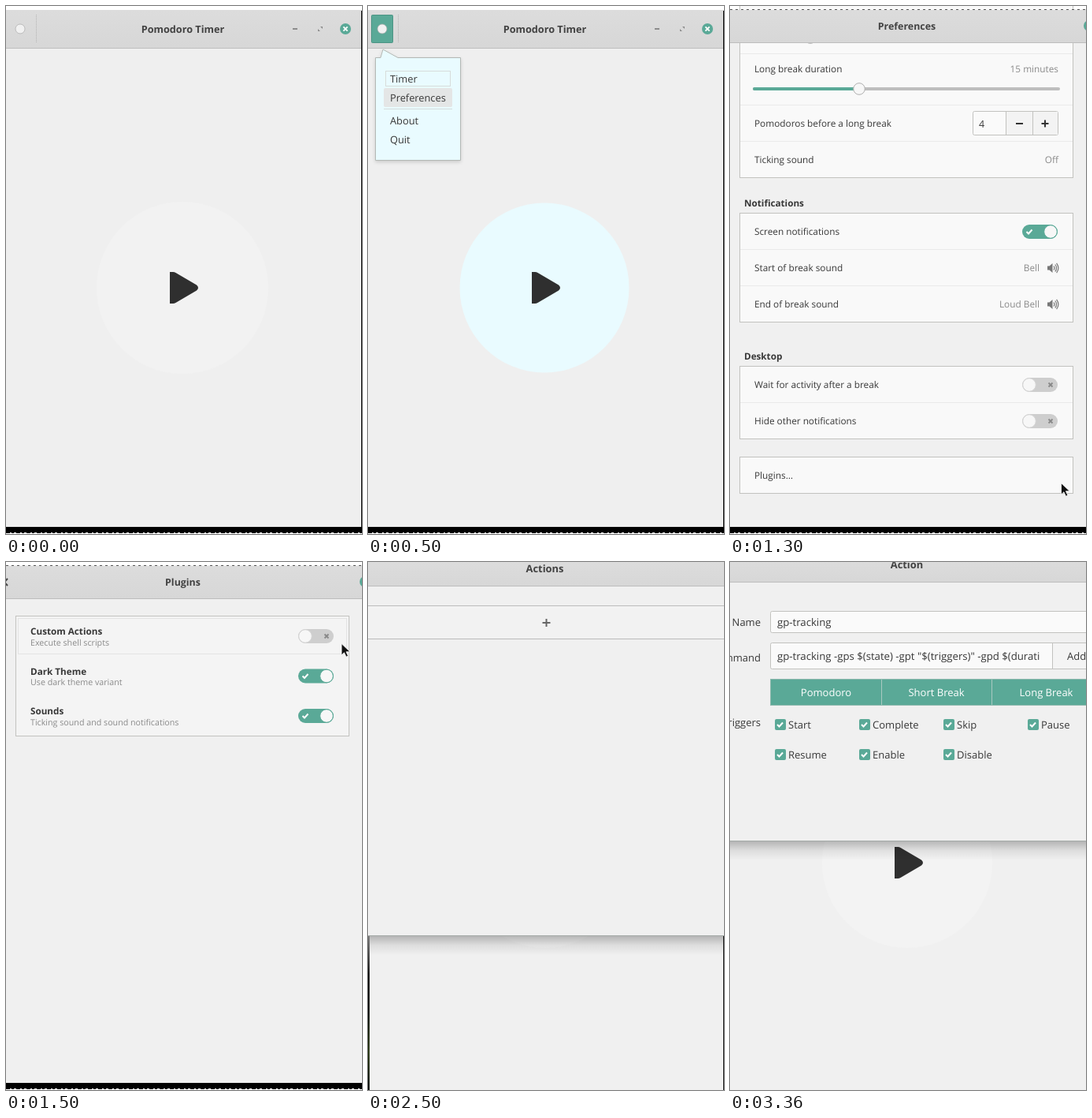
These frames come from a looping animation (452x669 px, 3600 ms). An HTML page:

```html
<!DOCTYPE html>
<html lang="en">
<head>
<meta charset="utf-8">
<title>Pomodoro timer tour</title>
<style>
  html, body { margin: 0; width: 100%; height: 100%; overflow: hidden; background: #fff; }
  svg { display: block; }
  text { font-family: "Open Sans", "Noto Sans", sans-serif; white-space: pre; text-rendering: geometricPrecision; }
</style>
</head>
<body>
<svg id="stage" width="452" height="669" viewBox="0 0 452 669"></svg>
<script>
const TEAL = '#5aa997', INK = '#383838', GREY = '#8a8a8a', EDGE = '#c2c2bf', PAPER = '#f0f0f0', ICE = '#e9fbff';

const rect = (x, y, w, h, fill, more = '') =>
  `<rect x="${x}" y="${y}" width="${w}" height="${h}" fill="${fill}" ${more}/>`;
const box = (x, y, w, h, fill = '#f9f9f9', more = '') =>
  rect(x + .5, y + .5, w, h, fill, `stroke="${EDGE}" ${more}`);
const circle = (x, y, r, fill, more = '') => `<circle cx="${x}" cy="${y}" r="${r}" fill="${fill}" ${more}/>`;
const stroke = (d, color, width = 1, more = '') =>
  `<path d="${d}" fill="none" stroke="${color}" stroke-width="${width}" ${more}/>`;
const rule = (x, y, w, color = '#eaeaea') => rect(x, y, w, 1, color);
const at = (x, y, content) => `<g transform="translate(${x} ${y})">${content}</g>`;

// y is the middle of the capitals
const text = (x, y, s, { size = 11.8, color = INK, anchor = 'start', weight = 400 } = {}) =>
  `<text x="${x}" y="${y + size * .37}" font-size="${size}" fill="${color}" text-anchor="${anchor}" font-weight="${weight}">${s}</text>`;
const title = (y, s, size = 12.4) => text(224.5, y, s, { size, color: '#424242', anchor: 'middle', weight: 700 });
const bold = (x, y, s) => text(x, y, s, { size: 11.7, weight: 700 });
const value = (x, y, s) => text(x, y, s, { color: GREY, anchor: 'end' });

const tick = (x, y) => stroke(`M${x - 3.5} ${y}l2.5 2.5 4.5-5`, '#fff', 2);
const cross = (x, y, r, color) =>
  stroke(`M${x - r} ${y - r}l${2 * r} ${2 * r}m0 ${-2 * r}l${-2 * r} ${2 * r}`, color, 1.8);
const plus = (x, y, r, color) => stroke(`M${x - r} ${y}h${2 * r}M${x} ${y - r}v${2 * r}`, color, 2);

const toggle = (y, on) =>
  rect(371, y - 9, 45, 18, on ? TEAL : '#cecece', 'rx="9"') +
  circle(on ? 407 : 380, y, 8.3, '#f7f7f7', `stroke="${on ? TEAL : '#d4d4d4'}"`) +
  (on ? tick(380, y) : cross(407, y, 2.5, '#888'));

const speaker = y => at(403, y,
  `<path d="M0-2.5h2.5l4-3.5v12l-4-3.5H0z" fill="#777"/>` +
  stroke('M8-2.5q2 2.5 0 5M9.8-4.5q3.4 4.5 0 9M11.6-6.2q4.6 6.2 0 12.4', '#777', 1.2));

const pointer = (x, y) => at(x, y,
  '<path d="M.5.5v14.5l3.4-3.2 2.6 5.4 2.4-1.1-2.5-5.3h4.9z" fill="#111" stroke="#fff" stroke-width=".8"/>');

const playButton = (x, y, r, fill) => circle(x, y, r, fill) +
  at(x - 16, y - 20, '<path d="M0 0h4q2 0 3.5 1L34 16.5q4 3.5 0 7L7.500 39q-1.500 1-3.500 1H0z" fill="#2f2f2f"/>');

const header = (top, bottom) =>
  rect(0, top, 452, bottom - top, 'url(#bar)') + rule(0, bottom, 452, '#bdbdbd');
const ground = () => rect(0, 660, 452, 7, '#000') +
  stroke('M0 667.5H452', '#000', 1, 'stroke-dasharray="5 2 3 3"');

function mainWindow(menuOpen) {
  const menu = () =>
    rect(4.5, 11.5, 27, 35, TEAL, 'rx="1" stroke="#4b9484"') +
    `<path d="M9.500 65.500h6.500l3-10.500 19 10.500h79.500v130H9.500z" fill="${ICE}" stroke="#b3b8b4" filter="url(#soft)"/>` +
    rect(22.5, 82.5, 82, 19, 'none', 'stroke="#c4bdb4" stroke-dasharray="1 1"') +
    rect(20, 104, 87, 24, '#e4e6e6', 'rx="2"') + rule(20, 130, 87, '#d5dcdc') +
    [['Timer', 92], ['Preferences', 116], ['About', 145], ['Quit', 169]]
      .map(([s, y]) => text(28, y, s, { size: 12.8 })).join('');
  return rect(0, 5, 451, 655, '#efefef') + header(5, 53) +
    playButton(224, 357, menuOpen ? 107.5 : 109, menuOpen ? ICE : '#f2f2f2') +
    stroke('M38.5 11V47', '#b4b4b4', 1, 'stroke-dasharray="1 1"') +
    title(29, 'Pomodoro Timer', 12.7) + (menuOpen ? menu() : '') +
    circle(18, 29, 6, '#f1f1f1', 'stroke="#aaa" stroke-width=".7"') +
    rect(364, 28, 6, 2, '#8c8c8c') +
    '<path d="M399 26h3v3zM396 29v3h3z" fill="#8c8c8c"/>' +
    circle(431, 29, 7, TEAL) + cross(431, 29, 2.6, '#fff') +
    rect(451, 6, 1, 660, '#000') + ground();
}

const settingsPage = (name, content) =>
  rect(0, 4, 452, 656, PAPER) + content + header(5, 46) +
  stroke('M0 4.5H452', '#555', 1, 'stroke-dasharray="3 4"') +
  title(25.5, name) + circle(456, 25, 7, TEAL) + ground();

function preferences(scroll, customActions) {
  const list =
    box(12, -20, 423, 237) + circle(102, 40, 7.5, '#f7f7f7', 'stroke="#bbb"') +
    [60, 125, 171].map(y => rule(13, y, 422)).join('') +
    text(31, 79.5, 'Long break duration') + value(417, 79.5, '15 minutes') +
    rect(29, 103, 390, 4, '#bebebe', 'rx="2"') + rect(29, 103, 135, 4, TEAL, 'rx="2"') +
    circle(164, 105, 7.3, '#f7f7f7', 'stroke="#b0b0b0"') +
    text(31, 149, 'Pomodoros before a long break') +
    box(308, 133, 108, 30, '#fafafa', 'rx="2"') + rect(351, 134, 65, 29, '#f3f3f3') +
    stroke('M350.5 134v30M384.5 134v30', EDGE) + text(316, 149, '4', { size: 12.5 }) +
    rect(363, 148, 9, 2, '#333') + plus(400, 149, 4.5, '#333') +
    text(31, 195, 'Ticking sound') + value(417, 195, 'Off') +
    bold(18, 250, 'Notifications') + box(12, 262, 423, 138) + rule(13, 308, 422) + rule(13, 354, 422) +
    text(31, 286, 'Screen notifications') + toggle(286, true) +
    text(31, 332, 'Start of break sound') + value(393, 332, 'Bell') + speaker(332) +
    text(31, 378, 'End of break sound') + value(393, 378, 'Loud Bell') + speaker(378) +
    bold(18, 444, 'Desktop') + box(12, 456, 423, 92) + rule(13, 502, 422) +
    text(31, 480, 'Wait for activity after a break') + toggle(480, false) +
    text(31, 526, 'Hide other notifications') + toggle(526, false) +
    box(12, 571, 423, customActions ? 92 : 46) +
    (customActions ? text(31, 594.5, 'Custom actions…') + rule(13, 617, 422) : '') +
    text(31, customActions ? 640.5 : 594.5, 'Plugins…');
  return settingsPage('Preferences', at(0, -scroll, list));
}

function plugins() {
  const rows = [
    ['Custom Actions', 'Execute shell scripts', false],
    ['Dark Theme', 'Use dark theme variant', true],
    ['Sounds', 'Ticking sound and sound notifications', true]
  ].map(([name, note, on], i) => at(0, i * 50.5,
    bold(31, 88, name) + text(31, 102, note, { size: 10.7, color: GREY }) + toggle(94, on)));
  return settingsPage('Plugins', box(12, 68, 423, 152, '#f4f4f4') +
    rect(15.5, 71.5, 417, 45, 'none', 'stroke="#d2d2d2" stroke-dasharray="1 1"') + rows.join('')) +
    stroke('M2 21l-4 4.5 4 4.5', '#444', 2);
}

const dialog = (bottom, headEnd, name, titleY, content) =>
  rect(0, 0, 452, 669, PAPER) + playButton(225, 381, 108, '#f3f3f3') +
  at(0, bottom, rect(0, 0, 452, 25, 'url(#shade)')) +
  rect(0, 0, 452, bottom, PAPER) + rule(0, bottom, 452, '#a4aaa7') +
  header(0, headEnd) + title(titleY, name, 12.9) + content;

const actions = () => dialog(473, 30, 'Actions', 8.5,
  rect(0, 56, 452, 41, '#f2f2f2') + rule(0, 55, 452, '#bcbcbc') + rule(0, 97, 452, '#bcbcbc') +
  plus(226.5, 77, 5, '#666') +
  rect(0, 474, 2, 195, 'url(#backdrop)') + rect(451, 474, 1, 195, '#111'));

function actionForm() {
  const field = (x, y, s, more) => text(x, y, s, { size: 13, ...more });
  const label = (y, s) => field(39, y, s, { anchor: 'end' });
  const checks = ['Start', 'Complete', 'Skip', 'Pause', 'Resume', 'Enable', 'Disable'].map((s, i) => {
    const x = 57 + i % 4 * 107, y = i < 4 ? 206 : 244;
    return rect(x, y - 7, 14, 14, TEAL, 'rx="2"') + tick(x + 6.5, y) + field(x + 17, y, s);
  });
  const tabs = [['Pomodoro', 122], ['Short Break', 262], ['Long Break', 401.5]]
    .map(([s, x]) => field(x, 165.5, s, { color: '#fff', anchor: 'middle' }));
  return dialog(353, 25, 'Action', 3,
    label(76, 'Name') + label(121, 'Command') + label(203, 'Triggers') +
    box(51, 62, 420, 27, '#fafafa', 'rx="2"') + field(60, 76, 'gp-tracking', { size: 13.2 }) +
    box(51, 102, 420, 33, '#fafafa', 'rx="2"') + box(409, 102, 60, 33, '#f4f4f4') +
    field(60, 119, 'gp-tracking -gps $(state) -gpt "$(triggers)" -gpd $(durati', { size: 13.2 }) +
    field(428, 119, 'Add') +
    rect(51.5, 148.5, 420, 33, TEAL, 'stroke="#8fb9ae"') +
    stroke('M192.500 149v32M332.500 149v32', '#a9c9c1') + tabs.join('') + checks.join(''));
}

const scenes = [
  mainWindow(false),
  mainWindow(true),
  preferences(0, false) + pointer(420, 604),
  plugins() + pointer(425.5, 103),
  preferences(46, true) + pointer(416, 563),
  actions(),
  actionForm()
];

const gradient = (id, ...stops) => `<linearGradient id="${id}" x2="0" y2="1">${stops.map(([color, opacity = 1], i) =>
  `<stop offset="${i / (stops.length - 1)}" stop-color="${color}" stop-opacity="${opacity}"/>`).join('')}</linearGradient>`;

const stage = document.getElementById('stage');
stage.innerHTML = '<defs>' +
  gradient('bar', ['#dcdcdc'], ['#d7d7d7']) +
  gradient('shade', ['#000', .26], ['#000', .08], ['#000', 0]) +
  gradient('backdrop', ['#777'], ['#111'], ['#10140c'], ['#2c3a18'], ['#0c1008']) +
  '<filter id="soft"><feDropShadow dx="0" dy="2" stdDeviation="2" flood-opacity=".15"/></filter></defs>' +
  scenes.map(s => `<g display="none">${s}</g>`).join('');
const layers = [...stage.children].slice(1);

const LOOP = 3600, HOLD = 500;
function draw() {
  const current = Math.min(6, Math.floor(performance.now() % LOOP / HOLD));
  layers.forEach((layer, i) => layer.setAttribute('display', i === current ? 'inline' : 'none'));
  requestAnimationFrame(draw);
}
draw();
</script>
</body>
</html>
```
